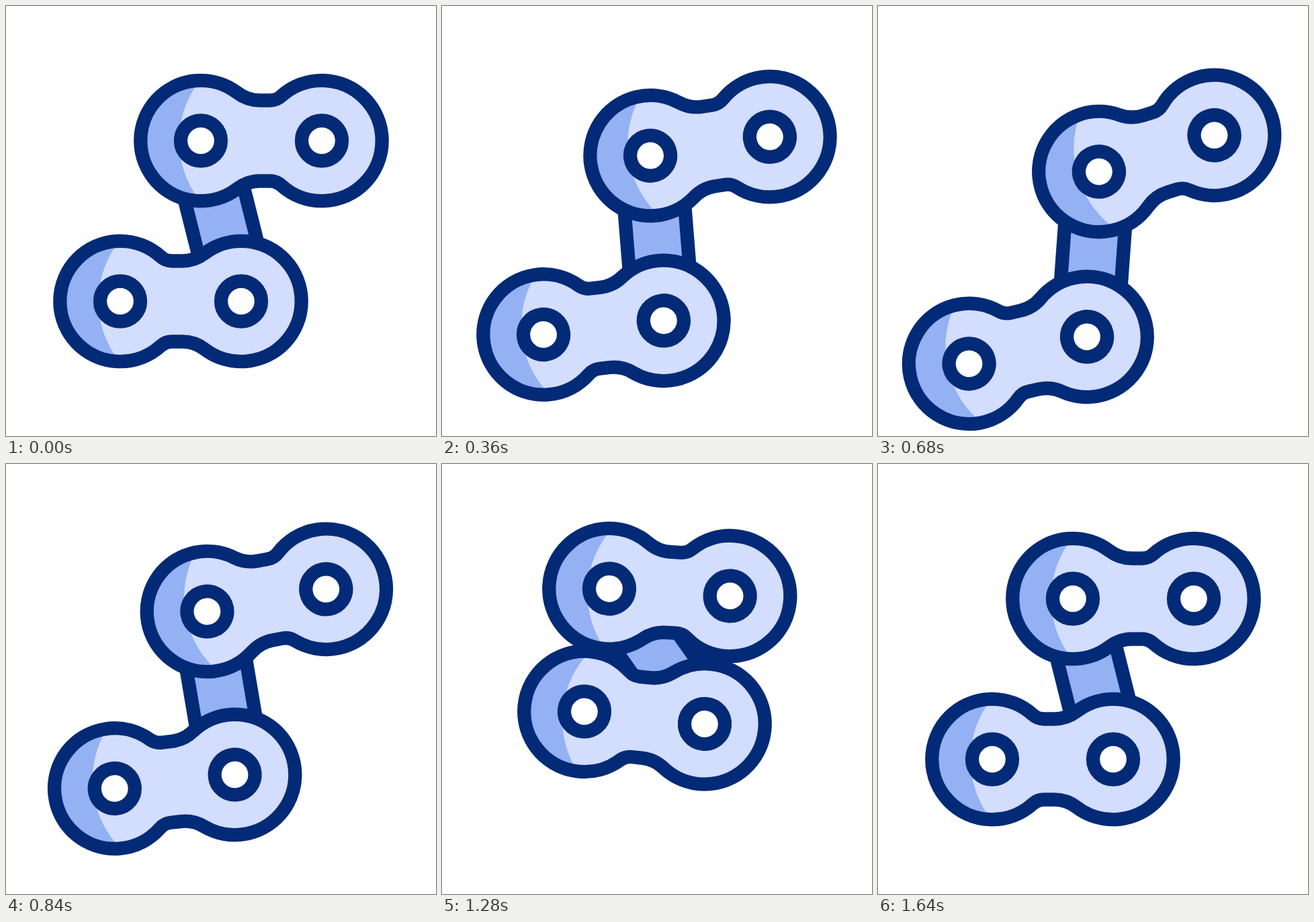
Animation of 640 by 640 pixels, one loop 2 s. Source, as an HTML page:

```html
<!DOCTYPE html>
<html lang="en">
<head>
<meta charset="utf-8">
<title>Chain links</title>
<style>
  html, body { margin: 0; width: 100%; height: 100%; overflow: hidden; background: #fff; }
  svg { display: block; width: 100vw; height: 100vh; }
  .line { fill: none; stroke: #032a76; stroke-width: 20.3; }
  .light { fill: #d3ddfd; }
  .mid { fill: #93b1f3; }
  .hole { fill: #fff; stroke: #032a76; stroke-width: 20.3; }
</style>
</head>
<body>
<svg viewBox="0 0 640 640">
  <defs>
    <clipPath id="body"><path id="clip"/></clipPath>
    <clipPath id="bodyFlip"><path id="clipFlip"/></clipPath>
  </defs>
  <g id="link">
    <rect class="mid" x="-105" y="-45" width="210" height="90"/>
    <path class="line" d="M-105-45H105M-105 45H105"/>
  </g>
  <g id="upper"></g>
  <g id="lower"></g>
</svg>
<script>
const HALF = 90;       // hole distance from plate centre
const LOBE = 89.7;     // lobe radius
const WAIST = 60;      // half height of the waist
const REACH = 123.2;   // half distance between the link's two pins
const REST = 75.9;     // link angle at rest
const FRAME = 40, LOOP = 2000;

// Each pose: time, vertical shift, link turn, upper tilt, lower tilt.
const poses = [
  [80, 0, 0, 0, 0],
  [640, 51, 19, -17.9, -13.2],
  [1160, -40, -25, 4.1, 7],
  [1640, 0, 0, 0, 0]
];

const $ = id => document.getElementById(id);

// Fillet centred at x, tangent to the waist line and to the lobe on the given side.
function fillet(x, side) {
  const dx = x - side * HALF;
  const r = (dx * dx + WAIST * WAIST - LOBE * LOBE) / (2 * (LOBE - WAIST));
  const k = LOBE / (LOBE + r);
  return { r, x, jx: side * HALF + dx * k, jy: (WAIST + r) * k };
}

function outline(flip) {
  const a = fillet(flip ? -13 : -2, -1);
  const b = fillet(flip ? 2 : 13, 1);
  const arc = (r, big, sweep, x, y) => `A${r} ${r} 0 ${big} ${sweep} ${x} ${y}`;
  return `M${a.jx} ${-a.jy}` + arc(a.r, 0, 0, a.x, -WAIST) + `H${b.x}` +
    arc(b.r, 0, 0, b.jx, -b.jy) + arc(LOBE, 1, 1, b.jx, b.jy) +
    arc(b.r, 0, 0, b.x, WAIST) + `H${a.x}` +
    arc(a.r, 0, 0, a.jx, a.jy) + arc(LOBE, 1, 1, a.jx, -a.jy) + 'Z';
}

function plate(id, clip, d) {
  const shade = 'M-90-100H-200V100H-90L-98.3 80A145 145 0 0 1-98.3-80Z';
  $(id).innerHTML = `<path class="light" d="${d}"/>
    <path class="mid" clip-path="url(#${clip})" d="${shade}"/>
    <path class="line" d="${d}"/>
    <circle class="hole" cx="${-HALF}" r="30"/>
    <circle class="hole" cx="${HALF}" r="30"/>`;
}

function poseAt(t) {
  const last = poses.length - 1;
  if (t <= poses[0][0]) return poses[0];
  if (t >= poses[last][0]) return poses[last];
  const i = poses.findIndex(p => p[0] > t);
  const from = poses[i - 1], to = poses[i];
  const u = (t - from[0]) / (to[0] - from[0]);
  const e = u * u * (3 - 2 * u);
  return from.map((v, j) => v + (to[j] - v) * e);
}

function place(id, x, y, deg) {
  $(id).setAttribute('transform', `translate(${x} ${y}) rotate(${deg})`);
}

// Hangs a plate by one of its pins (side -1 is the left pin).
function hang(id, px, py, side, deg) {
  const a = deg * Math.PI / 180;
  place(id, px - side * HALF * Math.cos(a), py - side * HALF * Math.sin(a), deg);
}

function draw(t) {
  const [, shift, turn, up, low] = poseAt(t);
  const cx = 320, cy = 320 + shift;
  const deg = REST + turn, a = deg * Math.PI / 180;
  const dx = REACH * Math.cos(a), dy = REACH * Math.sin(a);
  place('link', cx, cy, deg);
  hang('upper', cx - dx, cy - dy, -1, up);
  hang('lower', cx + dx, cy + dy, 1, low);
}

const shape = outline(false), shapeFlip = outline(true);
$('clip').setAttribute('d', shape);
$('clipFlip').setAttribute('d', shapeFlip);
plate('upper', 'body', shape);
plate('lower', 'bodyFlip', shapeFlip);

const start = performance.now();
function tick(now) {
  const t = Math.max(0, now - start) % LOOP;
  draw(Math.floor(t / FRAME) * FRAME);
  requestAnimationFrame(tick);
}
draw(0);
requestAnimationFrame(tick);
</script>
</body>
</html>
```
